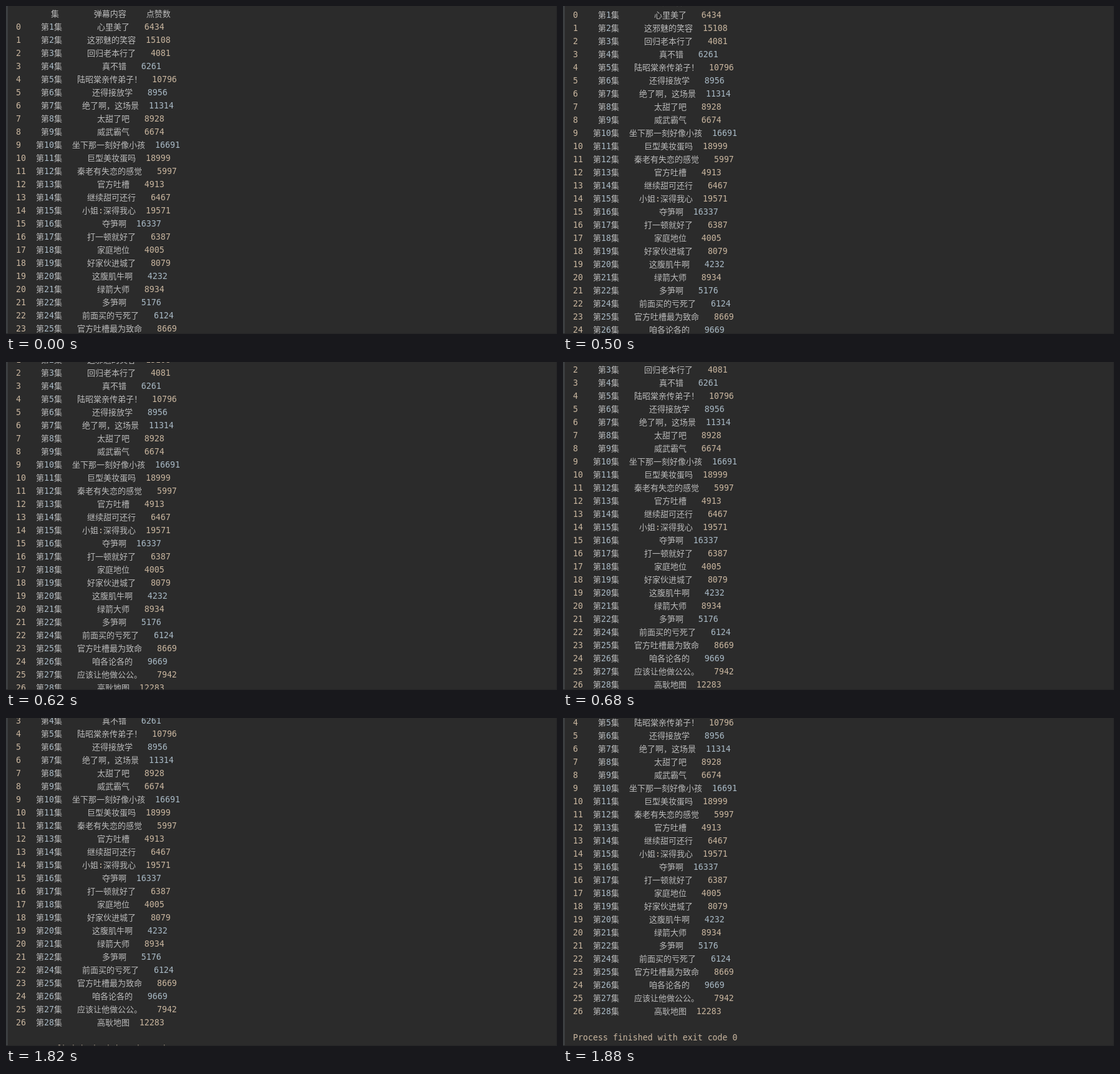
An HTML page that plays this animation: 883 by 525 pixels, repeating every 7220 ms.

```html
<!DOCTYPE html>
<html lang="zh-CN">
<head>
<meta charset="utf-8">
<title>Console</title>
<style>
html, body { margin: 0; width: 100%; height: 100%; overflow: hidden; background: #2b2b2b; }
#stage { position: relative; width: 883px; height: 525px; overflow: hidden; }
#gutter { position: absolute; left: 0; top: 0; width: 3px; height: 525px; background: #3c3f41; }
#edge { position: absolute; inset: 0; border: solid #242526; border-width: 0 1px 1px 0; }
#log {
  position: absolute; left: 16px; top: 2px;
  animation: scroll 7220ms step-end infinite;
}
.row {
  height: 21px; line-height: 21px; white-space: pre;
  font-family: "DejaVu Sans Mono", "Noto Sans Mono", monospace;
  font-size: 13.288px; color: #c9b69f;
  font-variant-ligatures: none;
}
.cjk {
  font-family: "Noto Sans CJK SC", "Noto Sans CJK", sans-serif;
  font-size: 13px; font-weight: 300; line-height: 0; color: #bbbbbb;
  text-spacing-trim: space-all;
}
.cool { color: #a9bac6; }
@keyframes scroll {
  0% { transform: translateY(0); }
  6.9252% { transform: translateY(-19px); }
  7.7562% { transform: translateY(-42px); }
  8.5872% { transform: translateY(-58px); }
  9.4183% { transform: translateY(-63px); }
  24.3767% { transform: translateY(-67px); }
  25.2078% { transform: translateY(-92px); }
  26.0388%, 100% { transform: translateY(-110px); }
}
</style>
</head>
<body>
<div id="stage">
  <div id="gutter"></div>
  <div id="log"></div>
  <div id="edge"></div>
</div>
<script>
const LEFT = 16, ASCII = 8, WIDE = 13;
const entries = `心里美了 6434
这邪魅的笑容 15108
回归老本行了 4081
真不错 6261
陆昭棠亲传弟子！ 10796
还得接放学 8956
绝了啊，这场景 11314
太甜了吧 8928
威武霸气 6674
坐下那一刻好像小孩 16691
巨型美妆蛋吗 18999
秦老有失恋的感觉 5997
官方吐槽 4913
继续甜可还行 6467
小姐:深得我心 19571
夺笋啊 16337
打一顿就好了 6387
家庭地位 4005
好家伙进城了 8079
这腹肌牛啊 4232
绿箭大师 8934
多笋啊 5176
前面买的亏死了 6124
官方吐槽最为致命 8669
咱各论各的 9669
应该让他做公公。 7942
高耿地图 12283`.split("\n");

const log = document.getElementById("log");

// Latin runs take a warm or cool tint from the parity of their x position.
function addRow(text) {
  const row = document.createElement("div");
  row.className = "row";
  let x = LEFT;
  for (const run of text.match(/[\x00-\x7f]+|[^\x00-\x7f]+/g) || []) {
    const span = document.createElement("span");
    const wide = run.charCodeAt(0) > 127;
    span.textContent = run;
    if (wide) span.className = "cjk";
    else if (x % 2) span.className = "cool";
    x += run.length * (wide ? WIDE : ASCII);
    row.append(span);
  }
  log.append(row);
}

addRow(" ".repeat(7) + "集" + " ".repeat(7) + "弹幕内容" + " ".repeat(4) + "点赞数");
entries.forEach((entry, i) => {
  const [text, likes] = entry.split(" ");
  const episode = `第${i + (i > 21 ? 2 : 1)}集`;
  addRow(String(i).padEnd(2) + episode.padStart(6) + text.padStart(11) + "  " + likes.padStart(5));
});
addRow("");
addRow("Process finished with exit code 0");
</script>
</body>
</html>
```
